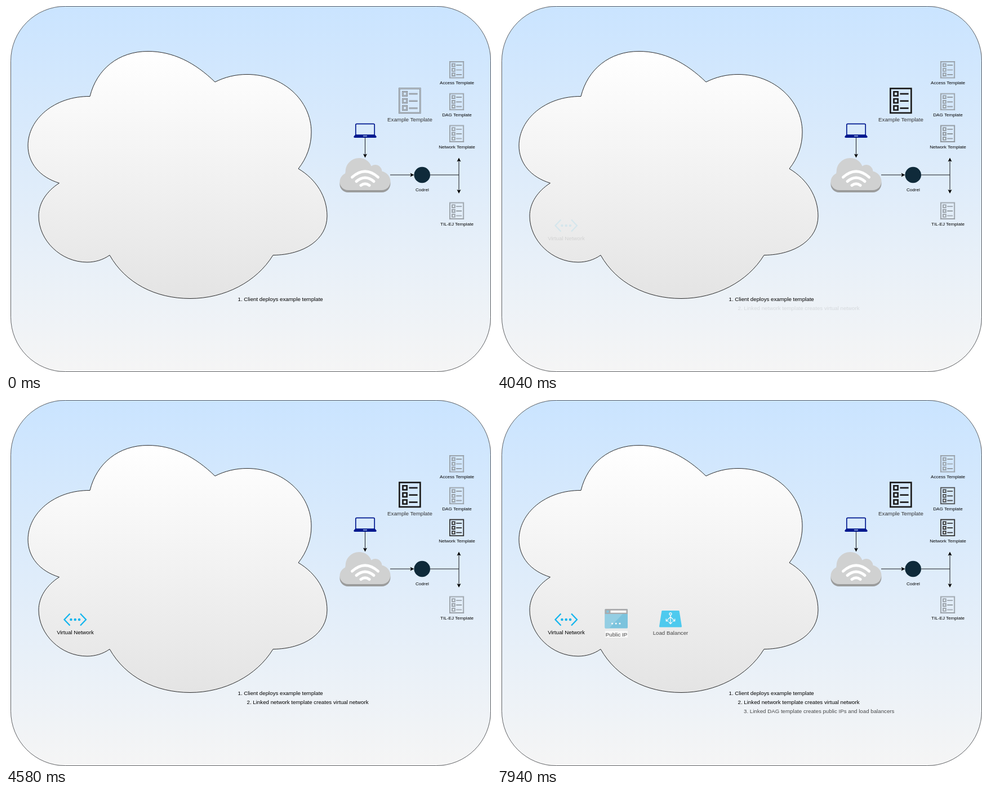
An HTML page for the animation above (8000 ms loop, 861 px wide and 650 px high).

```html
<!DOCTYPE html>
<html lang="en">
<head>
<meta charset="utf-8">
<title>Template deployment</title>
<style>
  html, body { margin: 0; width: 100%; height: 100%; overflow: hidden; background: #fff; }
  svg { display: block; width: 861px; height: 650px; }
  text { font: 9.72px "Liberation Sans", Arial, sans-serif; text-anchor: middle; }
  .small { font-size: 8.1px; }
  .left { text-anchor: start; }
  .line { fill: none; stroke: #000; stroke-width: .9; }
  .wifi { fill: none; stroke: #fff; stroke-width: 5; stroke-linecap: round; }
  .doc { fill: none; stroke-width: 2.5; }
  .step { opacity: 0; }
</style>
</head>
<body>
<svg viewBox="0 0 861 650">
  <defs>
    <linearGradient id="sky" x1="0" y1="0" x2="0" y2="1">
      <stop offset="0" stop-color="#cae4ff"/>
      <stop offset="1" stop-color="#f5f5f5"/>
    </linearGradient>
    <linearGradient id="mist" x1="0" y1="0" x2="0" y2="1">
      <stop offset="0" stop-color="#fff"/>
      <stop offset="1" stop-color="#e4e4e4"/>
    </linearGradient>
    <g id="doc" class="doc">
      <rect x="1.3" y="1.3" width="37" height="43.4"/>
      <path d="M7.5 7h7.2v7.2h-7.2zM7.5 19.7h7.2v7.2h-7.2zM7.5 32.4h7.2v7.2h-7.2zM18.5 10.8h15M18.5 23.5h15M18.5 36.2h15"/>
    </g>
    <path id="head" d="M0 0L-3.5 -7L0 -5.4L3.5 -7Z"/>
    <path id="puff" d="M607 327C599 327 592.500 320.500 592.500 312.500C592.500 305 597 299.500 603 297C601 282 613 270 627 270C637 270 645 275.500 648.500 284.500C656 278.500 667 284 667.500 293.500C676 295.500 682.500 303 682.500 311C682.500 320 676 327 667 327Z"/>
  </defs>

  <rect x="8.5" y=".5" width="852" height="649" rx="97" fill="url(#sky)" stroke="#36393d" stroke-width=".8"/>
  <path fill="url(#mist)" stroke="#111" stroke-width=".9" d="M149 160.500C161 112 200 80.500 252 80.500C296 80.500 335 100 371 135
    C389 126 408 121.500 428 121.500C492 121.500 542 168 542 224C542 248 534 270 519 289
    C551 308 570 339 570 373C570 414 530 442 474 442.500C445 490 388 519.500 327 519.500
    C265 519.500 212 492 184 442.500C172 451 158 455 144 455C97 455 58 416 58 373
    C58 350 72 329 94.500 314.500C60 304 39 279 39 248C39 201 86 160 149 160.500Z"/>

  <!-- laptop, uplink and repository -->
  <rect x="620.8" y="209.3" width="33.4" height="20" rx="1.8" fill="none" stroke="#00188f" stroke-width="1.7"/>
  <path d="M620 228.500H655L657.800 232Q657.800 234 656 234H619Q617.200 234 617.200 232Z" fill="#00188f"/>
  <path d="M634 230.200h7v1.300h-7z" fill="#c9d8f0"/>
  <use href="#puff" y="4" fill="#9b9c9c"/>
  <use href="#puff" fill="#d0d1d1"/>
  <path class="wifi" d="M614.500 304Q637.500 283.500 660.500 304M622 311.500Q637.500 298.500 653 311.500M630 318.500Q637.500 313 645 318.500"/>
  <path class="line" d="M637.500 234V264M682 300H719M753 300H804M804 275V328"/>
  <use href="#head" transform="translate(637.5 269.5)"/>
  <use href="#head" transform="translate(724.5 300) rotate(-90)"/>
  <use href="#head" transform="translate(804 269.5) rotate(180)"/>
  <use href="#head" transform="translate(804 333)"/>
  <circle cx="738.7" cy="300" r="14.3" fill="#0f2a3a"/>
  <text class="small" x="738.8" y="328.500">Codrel</text>

  <g id="docs"></g>
  <text class="left" x="411.500" y="523.500">1. Client deploys example template</text>

  <g class="step" data-start="4040">
    <path d="M113.500 379.500L103.500 390L113.500 400.500M132 379.500L142 390L132 400.500" fill="none" stroke="#12b5ee" stroke-width="2.3"/>
    <g fill="#12b5ee">
      <circle cx="115.400" cy="390" r="2.3"/><circle cx="122.700" cy="390" r="2.3"/><circle cx="130" cy="390" r="2.3"/>
    </g>
    <text x="123" y="415.500">Virtual Network</text>
    <text class="left" x="427.500" y="539.700">2. Linked network template creates virtual network</text>
  </g>

  <g class="step" data-start="7580">
    <rect x="191.500" y="371" width="40.500" height="34.500" rx="1.500" fill="#4db3d8"/>
    <path d="M191.500 380H223L199 405.500H193Q191.500 405.500 191.500 404Z" fill="#6fc2e0"/>
    <path d="M191.500 380V372.500Q191.500 371 193 371H230.500Q232 371 232 372.500V380Z" fill="#8f9092"/>
    <rect x="201.500" y="373.800" width="28" height="4" fill="#fff"/>
    <circle cx="196.500" cy="375.800" r="2.300" fill="#59b4d9"/>
    <g fill="#fff">
      <circle cx="204.500" cy="397" r="1.600"/><circle cx="211.200" cy="397" r="1.600"/><circle cx="218" cy="397" r="1.600"/>
      <rect x="192" y="410" width="40" height="12"/>
    </g>
    <text x="212" y="419.500">Public IP</text>

    <path d="M293.500 374H322.500Q323.500 374 323.700 375L328 402Q328 403.500 326.500 403.500H289.500Q288 403.500 288 402L292.300 375Q292.500 374 293.500 374Z" fill="#0cbcf0"/>
    <g fill="none" stroke="#fff" stroke-width="1.300">
      <circle cx="308" cy="380" r="2"/>
      <path d="M308 382V397M308 385L300.500 392.500M308 385L315.500 392.500M305 394.500L308 397.500L311 394.500M300.300 388.500V392.700H304.500M315.700 388.500V392.700H311.500"/>
    </g>
    <text x="308" y="417">Load Balancer</text>
    <text class="left" x="438" y="556">3. Linked DAG template creates public IPs and load balancers</text>
  </g>
</svg>
<script>
const LOOP = 8000, TICK = 60, STEPS = 10;

// label, icon x, icon y, scale, label x, label baseline, time it darkens
const docs = [
  ["Example Template", 697, 145.2, 1, 717, 204.6, 500],
  ["Access Template", 787, 98, .66, 800.5, 139.2],
  ["DAG Template", 787, 154.8, .66, 800.5, 196.2, 7580],
  ["Network Template", 787, 211.6, .66, 800.5, 253.2, 4040],
  ["TIL-EJ Template", 787, 348.6, .66, 800.5, 390.2]
];

const icon = (stroke, attrs = "") => `<use href="#doc" stroke="${stroke}" ${attrs}/>`;

document.getElementById("docs").innerHTML = docs.map(([label, x, y, k, tx, ty, start]) => {
  const big = k === 1;
  const dark = start ? icon(big ? "#1c1c1c" : "#333", `class="step" data-start="${start}"`) : "";
  return `<g transform="translate(${x} ${y}) scale(${k})">
    ${icon("#70757a")}<g class="core"></g>${dark}</g>
    <text class="${big ? "" : "small"}" x="${tx}" y="${ty}" fill="${big ? "#333" : "#000"}">${label}</text>`;
}).join("");

// pale core that makes the idle strokes look hollow
for (const g of document.querySelectorAll(".core")) {
  const core = document.getElementById("doc").cloneNode(true);
  core.removeAttribute("id");
  core.setAttribute("stroke", "#d3dde6");
  core.style.strokeWidth = .9;
  g.append(core);
}

const fades = [...document.querySelectorAll(".step")].map(el => [el, +el.dataset.start]);

function draw(now) {
  const t = now % LOOP;
  for (const [el, start] of fades) {
    const n = Math.floor((t - start) / TICK) + 1;
    el.style.opacity = Math.max(0, Math.min(STEPS, n)) / STEPS;
  }
}

const begin = performance.now();
function frame() {
  draw(performance.now() - begin);
  requestAnimationFrame(frame);
}
frame();
</script>
</body>
</html>
```
